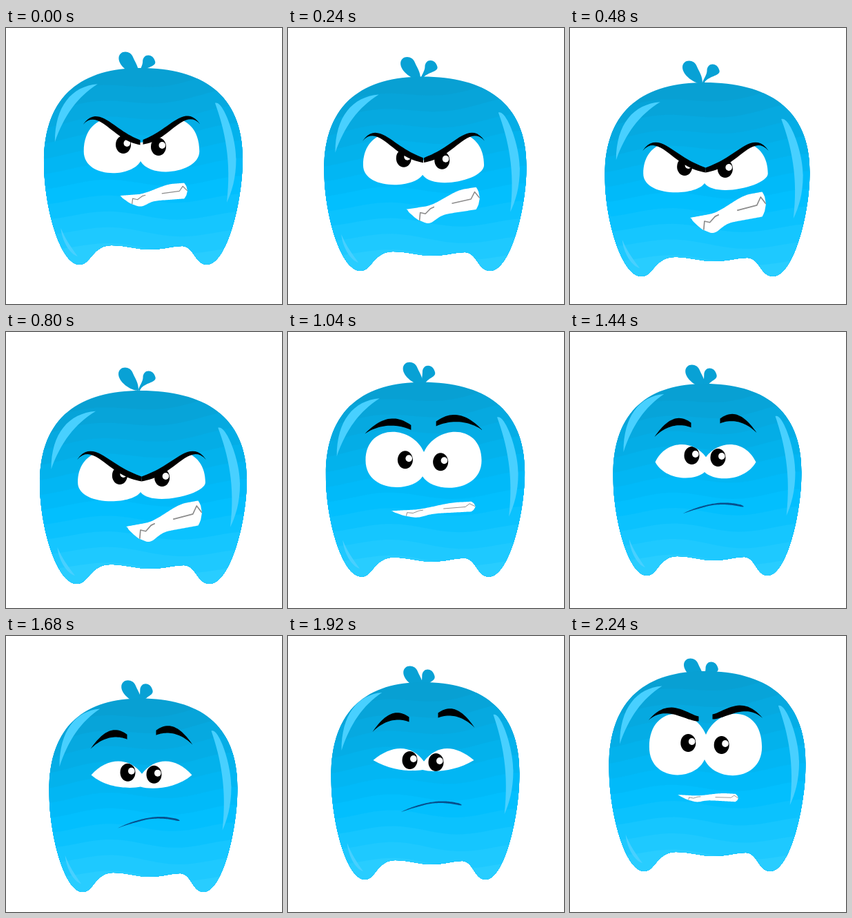
These frames come from a looping animation (400 by 400 pixels, 2.32 s). An HTML page with a canvas:

```html
<!DOCTYPE html>
<html lang="en">
<head>
<meta charset="utf-8">
<title>Moody blue monster</title>
<style>
html, body { margin: 0; width: 100%; height: 100%; overflow: hidden; background: #fff; }
canvas { display: block; width: 400px; height: 400px; }
</style>
</head>
<body>
<canvas id="stage"></canvas>
<script>
const LOOP = 2320, STEP = 80, AXIS = 196.5;
const canvas = document.getElementById('stage');
const ctx = canvas.getContext('2d');
const dpr = window.devicePixelRatio || 1;
canvas.width = canvas.height = 400 * dpr;
ctx.scale(dpr, dpr);

// Lids, brows and mouth are measured from the pupil height y.
// gap is half the distance between the brows; a small gap means anger.
const angry = { width: 288, top: 58, bottom: 343, tuft: 23, y: 169,
  lidTop: -38, lidBottom: 41, browOut: -29, browIn: -3, gap: 2,
  mouthX: 165, mouthW: 98, mouthY: 74, tilt: -7, open: 24 };
const furious = { width: 297, top: 79, bottom: 360, tuft: 31, y: 201,
  lidTop: -36, lidBottom: 37, browOut: -23, browIn: 5, gap: 0,
  mouthX: 174, mouthW: 110, mouthY: 74, tilt: -20, open: 38 };
const fuming = { ...furious, width: 300, top: 85, bottom: 365, tuft: 33, y: 208 };
const startled = { width: 279, top: 66, bottom: 349, tuft: 26, y: 173,
  lidTop: -43, lidBottom: 40, browOut: -46, browIn: -75, gap: 28,
  mouthX: 136, mouthW: 129, mouthY: 74, tilt: 1, open: 3 };
const doubtful = { width: 273, top: 75, bottom: 353, tuft: 27, y: 179,
  lidTop: -16, lidBottom: 32, browOut: -27, browIn: -44, gap: 21,
  mouthX: 162, mouthW: 90, mouthY: 85, tilt: -11, open: 3 };
const weary = { ...doubtful, top: 67, tuft: 23, y: 180,
  lidTop: -17, lidBottom: 14, browOut: -41, browIn: -59, mouthY: 76 };
const irked = { width: 285, top: 51, bottom: 341, tuft: 18, y: 155,
  lidTop: -42, lidBottom: 46, browOut: -33, browIn: -35, gap: 10,
  mouthX: 156, mouthW: 88, mouthY: 75, tilt: 5, open: 12 };

const keys = [[0, angry], [480, furious], [800, fuming], [1200, startled],
  [1440, doubtful], [1920, weary], [2240, irked]];

// Extra dips and hops: start, end, height
const bobs = [[1200, 1440, -5], [1440, 1920, 18], [1920, 2240, -8]];

const lerp = (a, b, k) => a + (b - a) * k;
const clamp = (v, lo = 0, hi = 1) => Math.min(hi, Math.max(lo, v));
const smooth = (a, b, v) => { const k = clamp((v - a) / (b - a)); return k * k * (3 - 2 * k); };
const range = (n, fn) => Array.from({ length: n + 1 }, (_, i) => fn(i / n));

const keyAt = i => {
  const n = keys.length, turn = Math.floor(i / n), [t, pose] = keys[i - turn * n];
  return [t + turn * LOOP, pose];
};

// Smooth interpolation that never passes beyond its keys
function poseAt(time) {
  let i = keys.length - 1;
  while (keys[i][0] > time) i--;
  const [a, b, c, d] = [-1, 0, 1, 2].map(o => keyAt(i + o));
  const span = c[0] - b[0], k = (time - b[0]) / span;
  const slope = (p, q, n) => (q[1][n] - p[1][n]) / (q[0] - p[0]);
  const bend = (p, q) => p * q <= 0 ? 0 : 2 * p * q / (p + q);
  const pose = {};
  for (const n in b[1]) {
    const mid = slope(b, c, n);
    const m0 = bend(slope(a, b, n), mid) * span, m1 = bend(mid, slope(c, d, n)) * span;
    pose[n] = lerp(b[1][n], c[1][n], k * k * (3 - 2 * k)) +
      k * (1 - k) * (m0 * (1 - k) - m1 * k);
  }
  for (const [from, to, height] of bobs) {
    if (time < from || time > to) continue;
    const dy = height * Math.sin(Math.PI * (time - from) / (to - from)) ** 2;
    pose.top += dy;
    pose.bottom += dy;
    pose.y += dy;
  }
  pose.anger = clamp(1 - pose.gap / 14);
  pose.reach = 73 + (pose.width - 273) * .72;
  return pose;
}

// Closed outline of cubic segments
function outline(p) {
  const path = new Path2D();
  path.moveTo(p[0], p[1]);
  for (let i = 2; i + 5 < p.length; i += 6) path.bezierCurveTo(...p.slice(i, i + 6));
  path.closePath();
  return path;
}
function polygon(points) {
  const path = new Path2D();
  points.forEach(p => path.lineTo(...p));
  path.closePath();
  return path;
}
function fill(path, color) {
  ctx.fillStyle = color;
  ctx.fill(path);
}
function oval(x, y, rx, ry, color) {
  const path = new Path2D();
  path.ellipse(x, y, rx, ry, 0, 0, 7);
  fill(path, color);
}
function clipped(path, paint) {
  ctx.save();
  ctx.clip(path);
  paint();
  ctx.restore();
}

function shade(k) {
  const stops = [[8, 160, 211], [0, 190, 254], [40, 205, 255]];
  const low = k > .62, f = low ? (k - .62) / .38 : k / .62;
  const a = stops[+low], b = stops[+low + 1];
  return `rgb(${a.map((v, i) => Math.round(lerp(v, b[i], f)))})`;
}

// One leaf of the tuft, placed by its tip
function leaf(x, y, root, size, lean) {
  const base = y + 33 * size;
  fill(outline([root, base, root - 12 * size + lean, base, x - 10 * size, y + 20 * size,
    x - 10 * size, y + 9, x - 10 * size, y - 3, x + 7 * size, y - 4,
    x + 11 * size, y + 8, x + 15 * size, y + 17, root + lean, base - 12, root, base]), shade(.03));
}

function drawTuft({ top, tuft, gap }) {
  const x = 173 + gap * .2, y = top - tuft;
  leaf(x, y, x + 19, 1, 0);
  leaf(x + 34 - gap * .4, y + 5, x + 21, .85, 4);
}

function drawBody({ width, top: T, bottom: B }) {
  const h = B - T, L = 199 - width / 2;
  const X = u => L + u * width, Y = v => T + v * h;
  const shape = outline([X(.487), T, X(.2), T, X(0), Y(.13), X(0), Y(.48),
    X(0), Y(.7), X(.08), B, X(.18), B,
    X(.235), B, X(.245), B - 28, X(.34), B - 28,
    X(.42), B - 28, X(.46), B - 22, X(.53), B - 22,
    X(.6), B - 22, X(.65), B - 27, X(.695), B - 27,
    X(.755), B - 27, X(.76), B, X(.82), B,
    X(.92), B, X(1), Y(.68), X(1), Y(.46),
    X(1), Y(.13), X(.79), T, X(.487), T]);
  fill(shape, shade(0));

  const bands = 12;
  clipped(shape, () => {
    for (let i = 1; i < bands; i++) {
      const k = i / bands, tilt = lerp(-36, 12, k);
      const crest = range(30, u =>
        [X(u), Y(k) + tilt * (u - .5) + 6 * Math.cos((u - .7) * 9 + (1 - k))]);
      fill(polygon([[L, B], ...crest, [X(1), B]]), shade(i / (bands - 1)));
    }
  });

  const H = T + 15 + (width - 273) * .55, G = H + 31 - (width - 273) * .3;
  const shine = '#48d0ff';
  fill(outline([X(.055), H + 84, X(.055), H + 32, X(.14), H + 3, X(.27), H,
    X(.17), H + 18, X(.1), H + 46, X(.055), H + 84]), shine);
  fill(outline([X(.861), G + 1, X(.9), G - 4, X(.967), G + 48, X(.967), G + 82,
    X(.967), G + 110, X(.945), G + 130, X(.92), G + 145,
    X(.945), G + 85, X(.91), G + 40, X(.861), G + 1]), shine);
  fill(outline([X(.085), B - 53, X(.09), B - 35, X(.13), B - 15, X(.17), B - 12,
    X(.14), B - 24, X(.105), B - 38, X(.085), B - 53]), shine);
}

// Points of a brow from its outer tip inwards; edge is -1 above, 1 below
function browLine(pose, side, edge) {
  const { y, reach, browOut, browIn, gap, anger } = pose;
  const skew = 1 + 2 * anger;
  const peak = skew ** skew / (1 + skew) ** (1 + skew);
  const lift = side > 0 ? Math.min(6, gap * .3) : 0;
  return range(24, s => {
    const arch = (12 + 4 * anger) * s * (1 - s) ** skew / peak;
    const thick = 5.2 * Math.sin(Math.PI * .77 * s);
    return [AXIS + side * lerp(reach + 1, gap, s),
      y + lerp(browOut, browIn, s) - lift - arch + edge * thick];
  });
}

function drawBrow(pose, side) {
  fill(polygon([...browLine(pose, side, -1), ...browLine(pose, side, 1).reverse()]), '#000');
}

function drawEyes(pose) {
  const { y, lidTop, lidBottom, reach, anger } = pose;
  const corner = (lidTop + lidBottom) / 2 + 1.5 + 8 * anger;
  const dent = 11 + .55 * lidTop, cusp = Math.min(24, lidBottom);
  const up = (8 * lidTop - corner - dent) / 6, down = (8 * lidBottom - corner - cusp) / 6;
  const pinch = Math.max(0, (70 - lidBottom + lidTop) * .7);
  const cheek = 16 * anger ** 4;
  const l = AXIS - reach, r = AXIS + reach, c = AXIS - 1.5;
  const p = [l, corner, l + pinch, up, c - 16, up, c + 2, dent,
    c + 21, up, r - pinch, up, r, corner,
    r - pinch, down - cheek, c + 16, down + 2, c, cusp,
    c - 14, down, l + pinch, down, l, corner];
  const eyes = outline(p.map((v, i) => i % 2 ? v + y : v));
  const underBrows = polygon([[0, 400], [0, y + pose.browOut], ...browLine(pose, -1, 0),
    ...browLine(pose, 1, 0).reverse(), [400, y + pose.browOut], [400, 400]]);
  clipped(underBrows, () => {
    fill(eyes, '#fff');
    clipped(eyes, () => {
      for (const side of [-1, 1]) {
        const x = AXIS - 1 + side * (19 + (reach - 73) * .6), py = y + 1.5 + side * 1.5;
        oval(x, py, 11, 13, '#000');
        oval(x + 5.3, py - 2, 4.8, 5, '#fff');
      }
    });
  });
}

// A closed mouth is a thin dark line, an open one shows clenched teeth
function drawMouth({ y, mouthX, mouthW, mouthY, tilt, open }) {
  const closed = open < 7;
  const bend = Math.max(0, 12 - open);
  const at = (s, offset) => [mouthX + s * mouthW,
    y + mouthY + s * tilt - bend * 4 * s * (1 - s) + offset];
  const cap = s => open * Math.sqrt(clamp((1 - s) / .05));
  const upper = s => at(s, -.49 * cap(s) * smooth(.25, .8, s));
  const lower = s => at(s, cap(s) *
    (.46 * smooth(-.05, .18, s) * smooth(0, .04, s) + .28 * Math.exp(-(((s - .31) / .13) ** 2))));
  const shape = polygon([...range(60, upper), ...range(60, s => lower(1 - s))]);
  fill(shape, closed ? '#07508d' : '#fff');
  if (closed) return;

  // Cracks: place along the mouth, depth below the upper edge
  const cracks = [[[.18, 1], [.19, .4], [.26, .45], [.33, .2], [.38, .2]],
    [[.62, .5], [.88, .5], [.93, .2], [1, .4]]];
  ctx.strokeStyle = '#8c8c8c';
  ctx.lineWidth = Math.min(1.7, .5 + open / 32);
  ctx.lineJoin = 'round';
  clipped(shape, () => {
    for (const crack of cracks) {
      ctx.beginPath();
      for (const [s, k] of crack) {
        const a = upper(s), b = lower(s);
        ctx.lineTo(a[0], lerp(a[1], b[1], k));
      }
      ctx.stroke();
    }
  });
}

function draw(time) {
  const pose = poseAt(time);
  ctx.fillStyle = '#fff';
  ctx.fillRect(0, 0, 400, 400);
  drawTuft(pose);
  drawBody(pose);
  drawEyes(pose);
  drawBrow(pose, -1);
  drawBrow(pose, 1);
  drawMouth(pose);
}

function tick() {
  const time = performance.now() % LOOP;
  draw(Math.floor(time / STEP) * STEP);
  requestAnimationFrame(tick);
}
tick();
</script>
</body>
</html>
```
